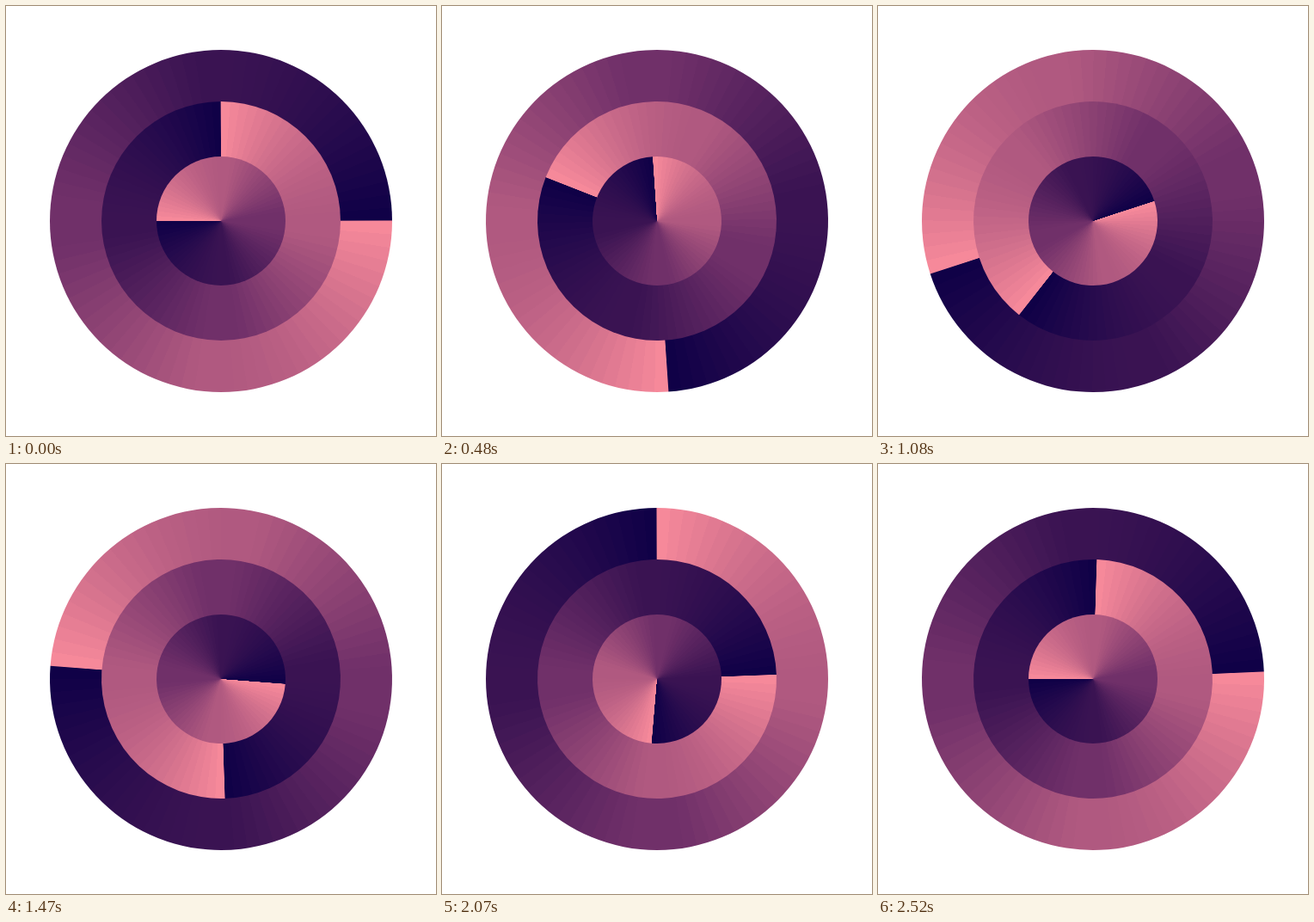
These frames come from a looping animation (500 by 500 pixels, 2550 ms). An HTML page:

```html
<!DOCTYPE html>
<html lang="en">
<head>
<meta charset="utf-8">
<title>Turning rings</title>
<style>
  html, body { margin: 0; width: 100%; height: 100%; overflow: hidden; background: #fff; }
  #stage { position: absolute; left: 0; top: 0; width: 500px; height: 500px; }
  .ring { position: absolute; border-radius: 50%; }
</style>
</head>
<body>
<div id="stage"></div>
<script>
const LOOP = 2550, STEP = 30, BAND = 4.5;

// Colours a quarter apart, clockwise from the seam
const COLORS = ["#f98b9b", "#b05980", "#703069", "#3a1352", "#0e0047"].map(hex =>
  [1, 3, 5].map(i => parseInt(hex.slice(i, i + 2), 16)));

// Steps at which the four quarter turns begin
const STARTS = [3.1, 25.5, 47, 66.9];

// len: steps per turn, lag: delay of each turn, late: extra delay and length of the last turn
const RINGS = [
  { r: 199, seam: 90, dir: 1, len: 14.7, lag: 0, late: 2 },
  { r: 139, seam: 0, dir: -1, len: 18.2, lag: 0.5, late: 0 },
  { r: 75, seam: 270, dir: 1, len: 14.7, lag: 0, late: 0 }
];

const clamp = x => Math.min(1, Math.max(0, x));
const ease = x => clamp(x) ** 2 * (3 - 2 * clamp(x));

// The blend flattens around the three inner colours
function blend(i, k) {
  if (i === 0) return 1 - (1 - k) ** 1.6;
  if (i === 3) return k ** 1.5;
  return clamp((k - 0.1) / 0.8);
}

function colorAt(angle) {
  const i = Math.floor(angle / 90);
  const k = blend(i, angle / 90 - i);
  return `rgb(${COLORS[i].map((c, j) => Math.round(c + (COLORS[i + 1][j] - c) * k))})`;
}

function fan() {
  const parts = [];
  for (let a = 0; a < 360; a += BAND) {
    const end = Math.min(a + BAND, 359.7);
    parts.push(`${colorAt(a + BAND / 2)} ${a}deg ${end}deg`);
  }
  parts.push(`${colorAt(0)} 360deg`);
  return `conic-gradient(${parts.join(",")})`;
}

const stage = document.getElementById("stage");
const paint = fan();
for (const ring of RINGS) {
  const el = ring.el = document.createElement("div");
  el.className = "ring";
  el.style.left = el.style.top = 250 - ring.r + "px";
  el.style.width = el.style.height = 2 * ring.r + "px";
  el.style.background = paint;
  stage.appendChild(el);
}

function turned(n, { len, lag, late }) {
  return STARTS.reduce((sum, start, i) => {
    const extra = i === STARTS.length - 1 ? late : 0;
    return sum + 90 * ease((n - start - lag - extra) / (len + extra));
  }, 0);
}

function draw(time) {
  const n = Math.floor(((time + 1) % LOOP) / STEP);
  for (const ring of RINGS) {
    ring.el.style.transform = `rotate(${ring.seam + ring.dir * turned(n, ring)}deg)`;
  }
}

function tick(now) {
  draw(now);
  requestAnimationFrame(tick);
}
draw(0);
requestAnimationFrame(tick);
</script>
</body>
</html>
```
